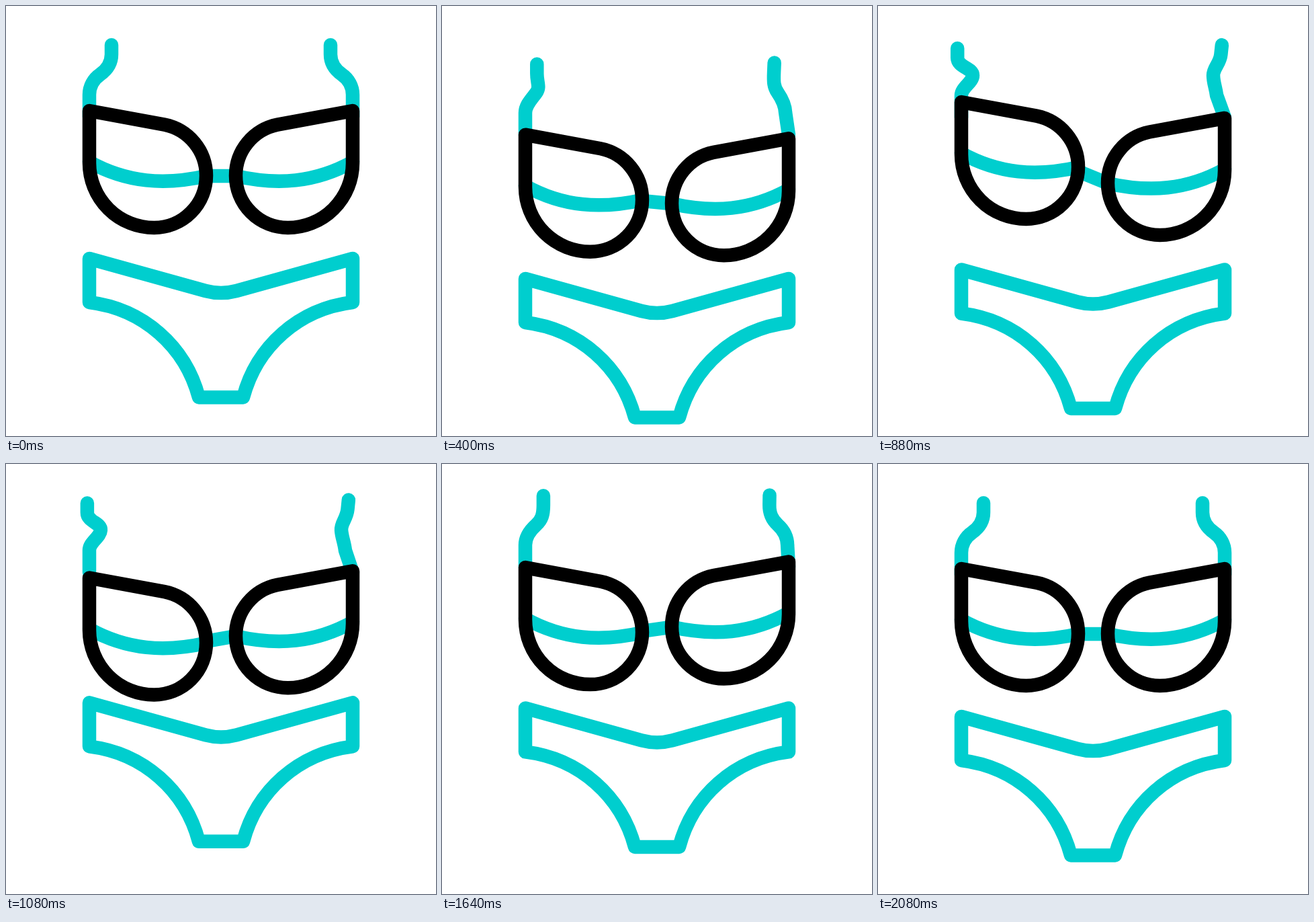
Write an HTML page with a canvas that moves like this. It is 640 px wide and 640 px high and loops after 2.48 s.

```html
<!DOCTYPE html>
<html>
<head>
<meta charset="utf-8">
<style>
html, body { margin: 0; width: 100%; height: 100%; overflow: hidden; background: #fff; }
canvas { display: block; width: 100vmin; height: 100vmin; }
</style>
</head>
<body>
<canvas id="stage" width="640" height="640"></canvas>
<script>
const ctx = document.getElementById('stage').getContext('2d');
const TEAL = '#00cece', BLACK = '#000';
const LOOP = 2480, STEP = 40, LAST = 2080;
const RISE = 400, HALF = 240, TURNS = 6;

const mix = (a, b, k) => a + (b - a) * k;
const ease = x => {
  x = Math.min(1, Math.max(0, x));
  return x * x * (3 - 2 * x);
};

// Damped bounce: eased moves between turning points that shrink each cycle.
function swing(t, { delay, down, up, downFade, upFade }) {
  const peak = i => {
    const n = Math.floor(i / 2);
    return i % 2 ? -up * upFade ** n : down * downFade ** n;
  };
  t -= delay;
  if (t < RISE) return peak(0) * ease(t / RISE);
  const i = Math.min(TURNS - 1, Math.floor((t - RISE) / HALF));
  const since = t - RISE - i * HALF;
  return i < TURNS - 1
    ? mix(peak(i), peak(i + 1), ease(since / HALF))
    : peak(i) * (1 - ease(since / (HALF * 1.5)));
}

const BRIEF_MOVE = { delay: 0, down: 30, up: 43, downFade: 0.55, upFade: 0.55 };
const STRAP_MOVE = { ...BRIEF_MOVE, delay: 80 };
const RIGHT_MOVE = { delay: 80, down: 46, up: 46, downFade: 0.67, upFade: 0.53 };
const LEFT_MOVE = { delay: 120, down: 45.5, up: 51, downFade: 0.55, upFade: 0.38 };

const bend = t => t < 920 ? ease(t / 920) : 1 - ease((t - 920) / 960);

function stroke(color, d, dy = 0) {
  ctx.save();
  ctx.translate(0, dy);
  ctx.strokeStyle = color;
  ctx.stroke(new Path2D(d));
  ctx.restore();
}

function mirrored(draw) {
  ctx.save();
  ctx.translate(640, 0);
  ctx.scale(-1, 1);
  draw();
  ctx.restore();
}

const CUP = 'M124 156 L236 176.6 A77.5 77.5 0 0 1 298 252.5 ' +
  'A77.5 77.5 0 0 1 220.5 330 A96.5 96.5 0 0 1 124 234 Z';
const BAND = 'M124 232 C180 263 236 267 298 253';
const BRIEF = 'M124 376 L297 424 C312 428 328 428 343 424 L516 376 V441 ' +
  'C435 451 373 507 353 582.5 H287 C267 507 205 451 124 441 Z';

// S-shaped strap; m bends it by moving the top and leaning the lower end in.
function strap(m, dy, topX, topY, lean) {
  const x = 157 + topX * m, y = 58 + topY * m;
  const midX = 140 + m, endX = 124 + lean * m;
  const tilt = lean * m / 8;
  const hx = 10 * (1 - m), hy = 7 + 4 * m;
  stroke(TEAL, `M${x} ${y} L${x + tilt} ${y + 14} ` +
    `C${x + 2 * tilt} ${y + 28} ${midX + hx} ${102 - hy} ${midX} 102 ` +
    `S${endX + tilt} 120 ${endX} 132 L124 165`, dy);
}

function draw(t) {
  const brief = swing(t, BRIEF_MOVE);
  const straps = swing(t, STRAP_MOVE);
  const left = swing(t, LEFT_MOVE);
  const right = swing(t, RIGHT_MOVE);
  const m = bend(t);

  ctx.fillStyle = '#fff';
  ctx.fillRect(0, 0, 640, 640);
  ctx.lineWidth = 20.5;
  ctx.lineCap = ctx.lineJoin = 'round';

  stroke(TEAL, BRIEF, brief);
  strap(m, straps, -39, 4, 0);
  stroke(TEAL, BAND, left);
  mirrored(() => {
    strap(m, straps, -29, -1, 12);
    stroke(TEAL, BAND, right);
  });
  stroke(TEAL, `M298 ${253 + mix(left, right, 0.25)} L342 ${253 + right}`);
  stroke(BLACK, CUP, left);
  mirrored(() => stroke(BLACK, CUP, right));
}

const start = performance.now();
function tick() {
  const t = (performance.now() - start) % LOOP;
  draw(Math.min(LAST, Math.floor(t / STEP) * STEP));
  requestAnimationFrame(tick);
}
tick();
</script>
</body>
</html>
```
